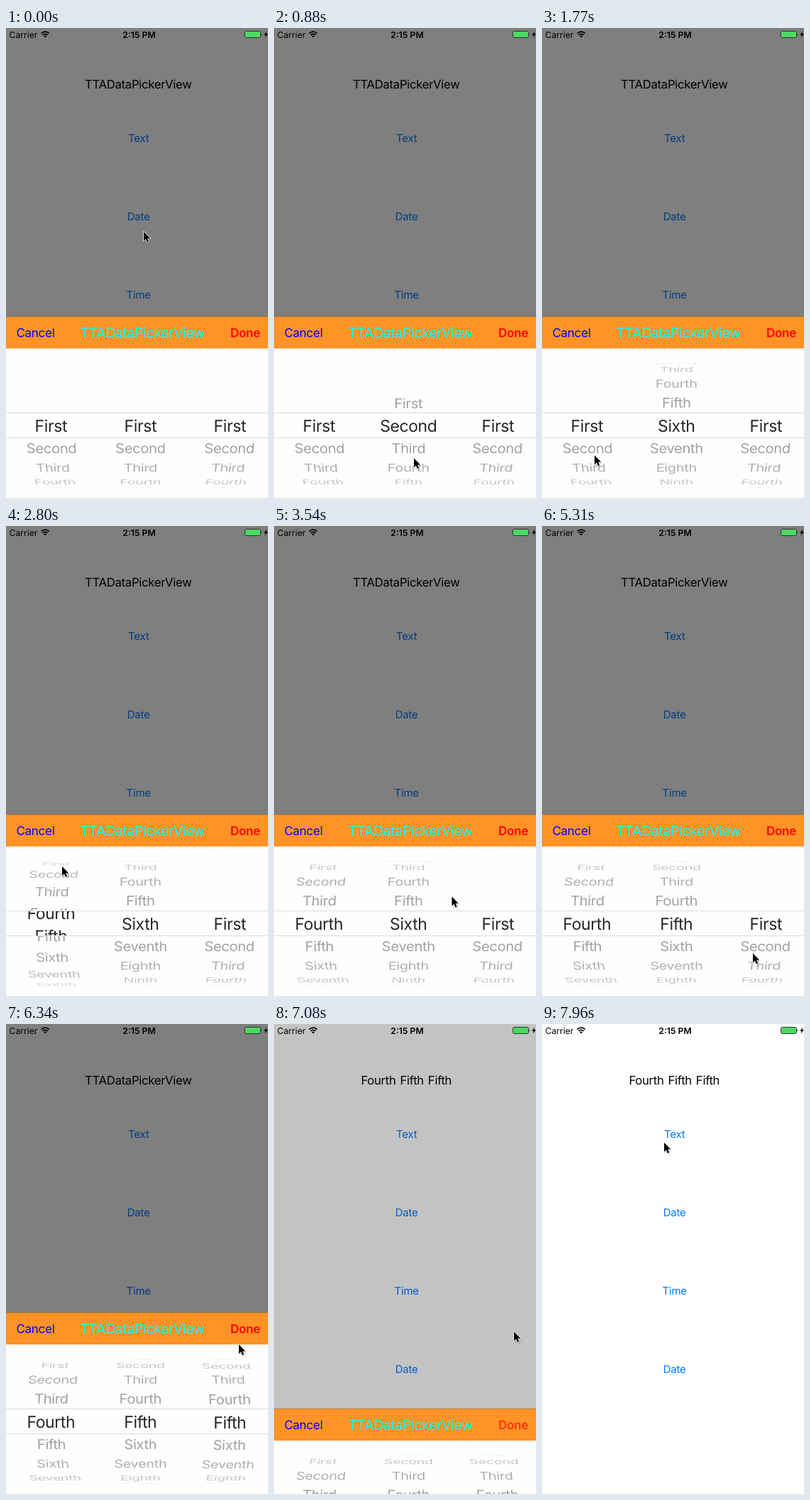
Write an HTML page that moves like this. It is 369 px wide and 660 px high and loops after 8000 ms.

```html
<!DOCTYPE html>
<html lang="en">
<head>
<meta charset="utf-8">
<title>Picker view</title>
<style>
  html, body { margin: 0; width: 100%; height: 100%; overflow: hidden; background: #fff; }
  svg { display: block; width: 100%; height: 100%; }
  text { font-family: Inter, Roboto, "Liberation Sans", sans-serif; text-rendering: geometricPrecision; }
  .mid { text-anchor: middle; }
  .label { font-size: 16.7px; letter-spacing: -.3px; word-spacing: 1.6px; }
  .link { font-size: 15px; letter-spacing: -.2px; fill: #007aff; }
  .status { font-size: 12.2px; }
  .bar { font-size: 17px; letter-spacing: -.3px; }
  .title { font-size: 19.5px; letter-spacing: -.02em; fill: #0ff; }
  .bold { font-weight: 600; }
  .wheel { font-size: 20.3px; letter-spacing: -.018em; fill: #9c9c9c; }
  .band { font-size: 23px; letter-spacing: -.018em; fill: #262626; }
</style>
</head>
<body>
<svg viewBox="0 0 369 660">
  <defs>
    <clipPath id="wheelClip"><path d="M0 470H369V540H0ZM0 576H369V646H0Z"/></clipPath>
    <clipPath id="bandClip"><path d="M0 541H369V575H0Z"/></clipPath>
    <filter id="blur" x="-50%" y="-50%" width="200%" height="200%"><feGaussianBlur stdDeviation="1"/></filter>
  </defs>

  <rect width="369" height="660" fill="#fff"/>
  <text id="label" class="label mid" x="186.3" y="85"></text>
  <g id="links" class="link mid"></g>
  <rect id="dim" width="369" height="660"/>

  <g class="status">
    <text x="4.5" y="13.8">Carrier</text>
    <text class="bold mid" x="187.5" y="13.8">2:15 PM</text>
  </g>
  <g fill="none" stroke="#000" stroke-width="1.8">
    <path d="M49.6 7.6Q55.2 2.6 60.8 7.6M51.7 9.9Q55.2 6.8 58.7 9.9"/>
    <path d="M55.2 13.4L53.2 11.4Q55.2 9.8 57.2 11.4Z" fill="#000" stroke="none"/>
  </g>
  <rect x="336.5" y="4.5" width="22" height="9" rx="2" fill="#4cd964" stroke="#333"/>
  <path d="M359.5 7.2Q361.4 9 359.5 10.8Z" fill="#333"/>
  <path d="M367.3 4.5L363.2 9.7H365.6L364.6 13.7L368.9 8.2H366.4Z"/>

  <g id="panel">
    <rect y="405" width="369" height="255" fill="#fefefe"/>
    <rect y="405" width="369" height="45" fill="#ff9325"/>
    <rect y="405" width="369" height="1" fill="#b8762f"/>
    <text class="bar" x="14.5" y="434.2" fill="#00f">Cancel</text>
    <text class="title mid" x="192" y="435">TTADataPickerView</text>
    <text id="done" class="bar bold mid" x="337" y="434.2" fill="#f00">Done</text>
    <g id="wheel" class="wheel mid" clip-path="url(#wheelClip)"></g>
    <g id="band" class="band mid" clip-path="url(#bandClip)"></g>
    <path d="M0 540.5H369M0 575.5H369" stroke="#dcdcdc"/>
  </g>

  <g id="cursor">
    <path d="M0 1V15L3.4 12L5.6 17L8.2 16L6 11H10.4Z" transform="translate(1 1.5)" opacity=".4" filter="url(#blur)"/>
    <path d="M0 0V14.4L3.3 11.4L5.5 16.6L8 15.5L5.8 10.5H10.3Z" stroke="#fff" stroke-width="1.8" paint-order="stroke" stroke-linejoin="round"/>
  </g>
</svg>
<script>
const LOOP = 8000, STEP = 147.3, CLOSE = 47;
const WORDS = ['First', 'Second', 'Third', 'Fourth', 'Fifth', 'Sixth', 'Seventh', 'Eighth', 'Ninth', 'Tenth'];
const MID_X = 189.3, MID_Y = 558.3, RADIUS = 88, ROW_ANGLE = 0.37;
const $ = id => document.getElementById(id);

// Smooth 0..1 ramp between steps a and b
function ease(s, a, b) {
  const u = Math.min(1, Math.max(0, (s - a) / (b - a)));
  return u * u * (3 - 2 * u);
}

// Selected row of each column: drags plus settling
const scrolls = [
  s => 3.45 * ease(s, 12, 19) - 0.45 * ease(s, 20, 23),
  s => 5 * ease(s, 4, 11) - 4.8 * ease(s, 25, 28) + 3.8 * ease(s, 28, 33),
  s => 3.97 * ease(s, 37, 41) + 0.03 * ease(s, 43, 44)
];

// Pointer stops: arrival step, x, y; it rests one step at each
const stops = [
  [0, 194, 286], [5, 197, 604], [8, 200, 460], [12, 74, 600], [19, 79, 478],
  [22, 290, 556], [25, 211, 485], [27, 209, 604], [32, 212, 463], [36, 297, 600],
  [41, 320, 462], [43, 328, 450], [47, 338, 432], [54, 172, 166.5]
];

function pointerAt(s) {
  let [at, x, y] = stops[0];
  for (const [next, nx, ny] of stops.slice(1)) {
    const e = ease(s, at + 1, next);
    x += (nx - x) * e;
    y += (ny - y) * e;
    at = next;
  }
  return [x, y];
}

function addText(parent, word, attrs) {
  const el = document.createElementNS('http://www.w3.org/2000/svg', 'text');
  el.textContent = word;
  for (const name in attrs) el.setAttribute(name, attrs[name]);
  return $(parent).appendChild(el);
}

['Text', 'Date', 'Time', 'Date'].forEach((word, i) =>
  addText('links', word, { x: 186.7, y: 160.4 + 110 * i }));

const columns = scrolls.map((position, i) => ({
  position,
  side: i - 1,
  rows: WORDS.map(word => [addText('wheel', word, { y: 7.4 }), addText('band', word, { y: 8.4 })])
}));

// Place a row on the cylinder; outer columns lean towards the middle
function placeRow([outer, inner], n, side) {
  const angle = n * ROW_ANGLE;
  const far = 1 - Math.cos(angle);
  const x = MID_X + side * (126 - 10 * far);
  const y = MID_Y + RADIUS * Math.sin(angle);
  const height = Math.cos(angle * 0.95);
  const skew = -side * 0.114 * Math.sin(angle);
  const matrix = `matrix(${1 - 0.05 * far} 0 ${skew} ${height} ${x} ${y})`;
  const show = (el, on) => {
    el.style.display = on ? '' : 'none';
    if (on) el.setAttribute('transform', matrix);
  };
  show(outer, Math.abs(n) < 4.3);
  show(inner, Math.abs(n) < 1.6);
  outer.setAttribute('opacity', Math.max(0.08, Math.cos(angle)) ** 0.7);
}

function draw(time) {
  const s = Math.floor((time % LOOP + 10) / STEP);
  for (const { position, side, rows } of columns) {
    const pos = position(s);
    rows.forEach((row, i) => placeRow(row, i - pos, side));
  }
  const closed = s >= CLOSE;
  const out = ease(s, CLOSE - 0.4, CLOSE + 2.3);
  $('panel').setAttribute('transform', `translate(0 ${Math.round(255 * out)})`);
  $('dim').setAttribute('opacity', 0.5 * (1 - out));
  $('done').setAttribute('opacity', closed ? Math.min(1, 0.3 + 0.35 * (s - CLOSE)) : 1);
  $('label').textContent = closed ? 'Fourth Fifth Fifth' : 'TTADataPickerView';
  $('cursor').setAttribute('transform', `translate(${pointerAt(s).join(' ')}) scale(.9)`);
}

const start = performance.now();
function tick() {
  draw(performance.now() - start);
  requestAnimationFrame(tick);
}
tick();
</script>
</body>
</html>
```
